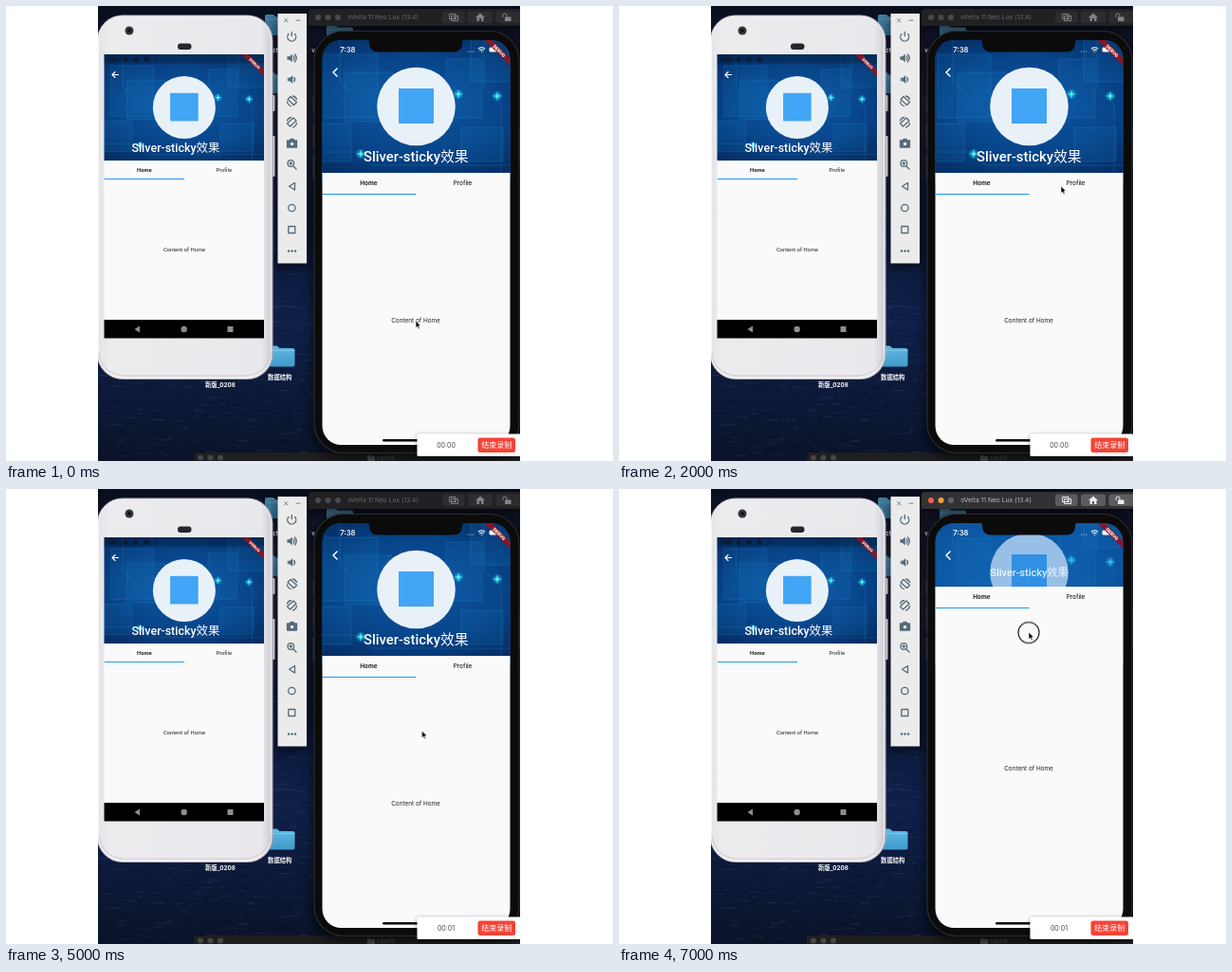
An HTML page for the animation above (8000 ms loop, 640 by 480 pixels).

```html
<!DOCTYPE html>
<html lang="zh">
<head>
<meta charset="utf-8">
<title>Sliver-sticky</title>
<style>
html, body { margin: 0; width: 100%; height: 100%; overflow: hidden; background: #fff; }
svg { display: block; width: 640px; height: 480px; }
text { text-anchor: middle; font-family: Inter, "Noto Sans CJK SC", "Noto Sans CJK", sans-serif; }
.rb text, .title { font-family: Roboto, "Noto Sans CJK SC", "Noto Sans CJK", sans-serif; }
.title { font-weight: 500; fill: #fff; }
.line { fill: none; stroke-linecap: round; stroke-linejoin: round; }

/* everything changes in hard one-second steps */
.cursor, .tap, .panel, .art, .head, .body, .t0, .t1, .on, .off {
  animation: 8s step-end infinite;
}
.cursor { animation-name: cursor; }
.tap { animation-name: tap; }
.panel { animation-name: panel; }
.art { animation-name: art; }
.head { animation-name: head; }
.body { animation-name: body; }
.t0 { animation-name: early; }
.t1 { animation-name: late; }
.off { animation-name: blur; }
.on { animation-name: focus; }

@keyframes cursor {
  0% { transform: translate(432px, 332px); }
  12.5% { transform: translate(447.5px, 206.5px); }
  25% { transform: translate(466px, 190px); }
  37.5% { transform: translate(474px, 186px); }
  50% { transform: translate(457px, 221px); }
  62.5% { transform: translate(438.5px, 255px); }
  75% { transform: translate(432px, 202.5px); }
  87.5%, 100% { transform: translate(432px, 151px); }
}
@keyframes tap {
  0% { visibility: hidden; }
  75% { visibility: visible; transform: translate(432px, 202.6px); }
  87.5%, 100% { visibility: visible; transform: translate(432px, 151.5px); }
}
@keyframes panel {
  0% { transform: none; }
  75% { transform: translateY(-.6px); }
  87.5%, 100% { transform: translateY(-73px); }
}
@keyframes art {
  0% { transform: none; opacity: 1; }
  75% { transform: translateY(-.2px); opacity: 1; }
  87.5%, 100% { transform: translateY(-18px); opacity: .62; }
}
@keyframes head {
  0% { transform: translate(432.3px, 163.6px); }
  75% { transform: translate(432.3px, 163px); }
  87.5%, 100% { transform: translate(432.3px, 92px) scale(.745); opacity: .85; }
}
@keyframes body {
  0% { transform: none; }
  75% { transform: translateY(-.3px); }
  87.5%, 100% { transform: translateY(-36.3px); }
}
@keyframes early { 0% { visibility: visible; } 62.5%, 100% { visibility: hidden; } }
@keyframes late { 0% { visibility: hidden; } 62.5%, 100% { visibility: visible; } }
@keyframes blur { 0% { visibility: visible; } 75%, 100% { visibility: hidden; } }
@keyframes focus { 0% { visibility: hidden; } 75%, 100% { visibility: visible; } }
</style>
</head>
<body>
<svg viewBox="0 0 640 480">
  <defs>
    <linearGradient id="sea" x2="0" y2="1">
      <stop offset="0" stop-color="#090e1e"/>
      <stop offset=".2" stop-color="#1a2036"/>
      <stop offset=".45" stop-color="#0b1838"/>
      <stop offset=".7" stop-color="#0f2049"/>
      <stop offset="1" stop-color="#0a1328"/>
    </linearGradient>
    <radialGradient id="sky" cx=".5" cy=".5" r=".65">
      <stop offset="0" stop-color="#0c59a8"/>
      <stop offset=".55" stop-color="#08458a"/>
      <stop offset="1" stop-color="#042b60"/>
    </radialGradient>
    <linearGradient id="shell">
      <stop offset="0" stop-color="#e3e4e9"/>
      <stop offset=".06" stop-color="#ececef"/>
      <stop offset=".94" stop-color="#e9e9ed"/>
      <stop offset="1" stop-color="#cfcfd6"/>
    </linearGradient>
    <linearGradient id="folder" x2="0" y2="1">
      <stop offset="0" stop-color="#62b9e2"/>
      <stop offset="1" stop-color="#3f9acb"/>
    </linearGradient>
    <radialGradient id="glow">
      <stop offset="0" stop-color="#7ff4ff"/>
      <stop offset=".3" stop-color="#19c3e2" stop-opacity=".75"/>
      <stop offset="1" stop-color="#12a0d8" stop-opacity="0"/>
    </radialGradient>
    <filter id="soft" x="-20%" y="-50%" width="140%" height="200%">
      <feDropShadow dx="0" dy="1" stdDeviation="2" flood-opacity=".45"/>
    </filter>
    <filter id="shade" x="-20%" y="-10%" width="140%" height="120%">
      <feGaussianBlur stdDeviation="6"/>
    </filter>
    <clipPath id="stage"><rect x="97" width="445" height="480"/></clipPath>
    <clipPath id="screenA"><rect x="103.5" y="51" width="168.5" height="299.5"/></clipPath>
    <clipPath id="screenB"><rect x="333.5" y="36" width="198" height="427" rx="20"/></clipPath>

    <g id="spark">
      <circle r="6" fill="url(#glow)"/>
      <path d="M0-5 .8-.8 5 0 .8 .8 0 5-.8 .8-5 0-.8-.8Z" fill="#5ff0f5"/>
    </g>

    <!-- banner picture, 140 high, centred on x = 0 -->
    <g id="banner">
      <rect x="-125" width="250" height="140" fill="url(#sky)"/>
      <g fill="#1c86cf" fill-opacity=".12" stroke="#2aa3de" stroke-opacity=".3" stroke-width=".7">
        <rect x="-96" y="15" width="56" height="67"/>
        <rect x="-75" y="34" width="50" height="52"/>
        <rect x="-104" y="88" width="36" height="40"/>
        <rect x="32" y="20" width="38" height="62"/>
        <rect x="58" y="-6" width="52" height="50"/>
        <rect x="48" y="92" width="44" height="36"/>
      </g>
      <path d="M-125 118H-60L-46 132H125M-80 0V44L-64 60M72 0V50L90 68V140" class="line" stroke="#33b5e6" stroke-opacity=".3" stroke-width=".6"/>
      <use href="#spark" x="45" y="57"/>
      <use href="#spark" x="86" y="59"/>
      <use href="#spark" x="-58" y="120"/>
      <circle cx=".5" cy="70" r="41.3" fill="#e9f1f8"/>
      <rect x="-18" y="51" width="37" height="37" fill="#42a5f5"/>
    </g>

    <g id="dirIcon">
      <path d="M-14-9q0-2 2-2h7l3 2.5h14q2 0 2 2V9q0 2-2 2h-24q-2 0-2-2Z" fill="url(#folder)"/>
      <path d="M-14-6h28" stroke="#8ccfea" stroke-width=".8"/>
    </g>

    <g id="ribbon">
      <path d="M-40 28H40V40H-40Z" fill="#94131f" fill-opacity=".9"/>
      <text y="37.6" font-size="10" font-weight="800" fill="#fff">DEBUG</text>
    </g>
    <g id="lights"><circle r="3"/><circle cx="10.5" r="3"/><circle cx="21" r="3"/></g>

    <!-- emulator window buttons -->
    <g id="winBtns" fill="currentColor">
      <rect x="460" y="5.5" width="23.5" height="12.5" rx="2"/>
      <rect x="487" y="5.5" width="26" height="12.5" rx="2"/>
      <rect x="516.5" y="5.5" width="30" height="12.5" rx="2"/>
    </g>
    <g id="winIcons">
      <path d="M468 8.500h6v5h-6ZM470 10.500h6.500v5h-6.500Z" class="line" stroke="currentColor"/>
      <circle cx="473.300" cy="13" r="1.300" fill="currentColor"/>
      <path d="M495 12 500 7.500 505 12H503.500V16H501V13H499V16H496.500V12Z" fill="currentColor"/>
      <path d="M526 11.500h6.500v4.500h-6.500Z" fill="currentColor"/>
      <path d="M524 11.500V10a2 2 0 0 1 4 0v1.500" class="line" stroke="currentColor"/>
    </g>
  </defs>

  <g clip-path="url(#stage)">
    <!-- desktop -->
    <rect x="97" width="445" height="480" fill="url(#sea)"/>
    <g id="waves" class="line" stroke-width=".8"/>
    <g opacity=".65">
      <use href="#dirIcon" x="287" y="20"/>
      <use href="#dirIcon" x="287" y="81"/>
    </g>
    <use href="#dirIcon" x="352" y="31" opacity=".6"/>
    <use href="#dirIcon" x="290.500" y="369.500"/>
    <g fill="#fff" font-size="6.300" font-weight="600">
      <text x="288.700" y="393.700">数据结构</text>
      <text x="226" y="402.200" font-size="6.300" font-weight="700">新版_0208</text>
      <text x="284" y="48.500" font-size="6">ct</text>
      <text x="324" y="48.500" font-size="6">v</text>
    </g>

    <!-- window at the bottom edge -->
    <path d="M198 480V474q0-3 3-3H542V480Z" fill="#1f1f21"/>
    <use href="#lights" x="205" y="476.500" fill="#464648"/>
    <path d="M381 474h3l1 1h4v5h-8Z" fill="#4e5154"/>
    <text x="400" y="479" font-size="6.500" fill="#58585b">case9</text>

    <!-- window shadows -->
    <g filter="url(#shade)" opacity=".6">
      <rect x="320" y="3" width="230" height="20"/>
      <rect x="323" y="28" width="222" height="450" rx="30"/>
      <rect x="286" y="12" width="31" height="264"/>
    </g>

    <!-- left phone -->
    <g class="rb">
      <rect x="280" y="94" width="3.500" height="17" rx="1" fill="#b9b3b8"/>
      <rect x="280" y="137" width="3.500" height="43" rx="1" fill="#c5bfc4"/>
      <rect x="96" y="9.500" width="185.500" height="384.500" rx="27" fill="#bdb4b9"/>
      <rect x="97.500" y="11" width="182" height="381.500" rx="25" fill="url(#shell)" stroke="#f5f5f8"/>
      <path d="M98 366Q101 388 124 390H252Q276 388 279 366" class="line" stroke="#cbbfc3" stroke-width=".8"/>
      <circle cx="130" cy="26" r="4.500" fill="#33363b"/>
      <circle cx="130" cy="26" r="2" fill="#10141c"/>
      <rect x="181" y="39.500" width="14.500" height="6.500" rx="3" fill="#26272a"/>
      <g clip-path="url(#screenA)">
        <use href="#banner" transform="translate(187.500 51) scale(.8)"/>
        <path d="M103 51h170v9.500H103Z" fill="#000" fill-opacity=".22"/>
        <g fill="#0a1c38">
          <rect x="108" y="54" width="11" height="4" rx="1"/>
          <circle cx="126" cy="56" r="2.600"/><circle cx="137" cy="56" r="2.600"/>
          <rect x="145.500" y="53.500" width="5" height="5" rx="1"/><circle cx="158.500" cy="56" r="1"/>
        </g>
        <path d="M103 163.500h170V331H103Z" fill="#fafafa"/>
        <path d="M118.500 72.500h-6.500m3-3-3 3 3 3" class="line" stroke="#fff" stroke-width="1.100"/>
        <text x="179" y="153.500" class="title" font-size="12.500">Sliver-sticky效果</text>
        <g font-size="5.800" fill="#212121">
          <text x="145.800" y="175" font-weight="700">Home</text>
          <text x="229.800" y="175">Profile</text>
          <text x="188" y="259.200">Content of Home</text>
        </g>
        <path d="M103.500 182h84.500v1h-84.500Z" fill="#2196f3"/>
        <path d="M103 331h170v20H103Z"/>
        <g fill="#8d8d8d">
          <path d="M141 337.500v7l-5.500-3.500Z"/><circle cx="187.700" cy="341" r="3.200"/>
          <rect x="233.500" y="338" width="6" height="6"/>
        </g>
        <use href="#ribbon" transform="translate(272 51) rotate(45) scale(.41)"/>
      </g>
    </g>

    <!-- tool strip -->
    <rect x="286.500" y="8" width="30.500" height="263.500" fill="#ebebeb"/>
    <g class="line" stroke="#546a78" stroke-width="1.300">
      <path d="m293.500 13.500 3.500 3.500m0-3.500-3.500 3.500m12.500-1.800h4" stroke-width=".8"/>
      <path d="M298 29.500a4.500 4.500 0 1 0 6.500 0M301.300 27.500v4"/>
      <g id="vol" fill="#546a78"><path d="M297 53.500h1.800l2.700-2.300v7.600l-2.700-2.300H297Z" stroke-width=".6"/></g>
      <path d="M303.300 53q1.600 2 0 4M304.500 51q3.500 4 0 8"/>
      <path d="M303.800 75.500q1.600 2 0 4"/>
      <use href="#vol" x=".5" y="22.500"/>
      <g id="turn">
        <path d="m297 98.500 3-3 6.500 6-3 3ZM296.500 101q.5 3.500 4 4.500M302.500 95q3 .5 4 3.500"/>
      </g>
      <use href="#turn" transform="translate(603 22.500) scale(-1 1)"/>
      <path d="M296.500 142h2.500l1-1.500h3l1 1.500h2.500v7h-10Z" fill="#546a78"/>
      <circle cx="301.500" cy="145.500" r="1.800" fill="#ebebeb" stroke="none"/>
      <circle cx="300.300" cy="166" r="3.300"/>
      <path d="m303 169 3 3m-7-6h2.600m-1.300-1.300v2.600"/>
      <path d="M304.500 186.500v7.500l-6-3.700Z"/>
      <circle cx="301.300" cy="213" r="3.700"/>
      <rect x="297.800" y="232.500" width="7" height="7"/>
    </g>
    <g fill="#546a78"><circle cx="298" cy="258.500" r="1.200"/><circle cx="301.500" cy="258.500" r="1.200"/><circle cx="305" cy="258.500" r="1.200"/></g>

    <!-- simulator title bar -->
    <g class="off">
      <path d="M319 21V7q0-4 4-4H542V21Z" fill="#212123"/>
      <use href="#lights" x="329" y="12" fill="#4a4a4c"/>
      <use href="#winBtns" color="#2d2d30"/>
      <use href="#winIcons" color="#838386"/>
      <text x="397.500" y="14.300" font-size="6.700" fill="#6a6a6e">oVelta 11 Neo Lux (13.4)</text>
    </g>
    <g class="on">
      <path d="M319 21V7q0-4 4-4H542V21Z" fill="#323235"/>
      <circle cx="329" cy="12" r="3" fill="#f65d55"/>
      <circle cx="339.500" cy="12" r="3" fill="#f0a33a"/>
      <circle cx="350" cy="12" r="3" fill="#646467"/>
      <use href="#winBtns" color="#5c5c5f"/>
      <use href="#winIcons" color="#ececee"/>
      <text x="397.500" y="14.300" font-size="6.700" fill="#bcbcc0">oVelta 11 Neo Lux (13.4)</text>
    </g>

    <!-- right phone -->
    <path d="M324.500 97v14m0 13v25m0 8v25M541.500 128v40" stroke="#2d2d2f" stroke-width="2"/>
    <rect x="325" y="26.500" width="216" height="445" rx="31" fill="#0b0b0c" stroke="#2c2c2e" stroke-width="1.200"/>
    <g clip-path="url(#screenB)">
      <path d="M333 36h199v150H333Z" fill="#156fc4"/>
      <g class="art"><use href="#banner" x="432" y="36"/></g>
      <g class="panel">
        <path d="M333 176h199v400H333Z" fill="#fafafa"/>
        <g font-size="6.400" fill="#212121">
          <text x="382.500" y="189.300" font-weight="700">Home</text>
          <text x="481.500" y="189.300" font-weight="500">Profile</text>
        </g>
        <path d="M333.500 198H432.500v1.100h-99Z" fill="#2196f3"/>
      </g>
      <g class="body"><text x="432" y="333.700" font-size="6.400" fill="#212121">Content of Home</text></g>
      <g class="head"><text class="title" font-size="14.800">Sliver-sticky效果</text></g>
      <path d="m349 66-4 4 4 4" class="line" stroke="#fff" stroke-width="1.500"/>
      <text x="360.300" y="49" font-size="7.600" font-weight="600" fill="#fff">7:38</text>
      <g fill="#fff">
        <circle cx="487.500" cy="48" r=".5"/><circle cx="490" cy="48" r=".5"/><circle cx="492.500" cy="48" r=".5"/>
        <rect x="509.500" y="43.500" width="10.500" height="5" rx="1.500"/>
      </g>
      <path d="M498.300 45q3.200-2.500 6.400 0m-5 1.700q1.800-1.400 3.600 0m-1.800 1.600v.1" class="line" stroke="#fff" stroke-width="1.100"/>
      <path d="M379 35H485q-4 0-4 4 0 9.500-10 9.500H393q-10 0-10-9.500 0-4-4-4Z" fill="#0b0b0c"/>
      <use href="#ribbon" transform="translate(531.500 36) rotate(45) scale(.478)"/>
      <rect x="397" y="457" width="70" height="2.400" rx="1.200"/>
    </g>

    <!-- recorder -->
    <rect x="433.500" y="451.500" width="110" height="23.500" rx="1.500" fill="#fff" filter="url(#soft)"/>
    <g font-size="7" fill="#444">
      <text x="464" y="465.800" class="t0">00:00</text>
      <text x="464" y="465.800" class="t1">00:01</text>
    </g>
    <rect x="497.500" y="455.500" width="39.500" height="15.500" rx="2.500" fill="#f44336"/>
    <text x="517.200" y="466.200" font-size="8" font-weight="500" fill="#fff">结束录制</text>

    <!-- pointer -->
    <circle class="tap line" r="11" stroke="#111" stroke-width="1.100"/>
    <path class="cursor" d="M0 0V7.500L1.700 6 2.900 8.700 4.200 8.100 3 5.500H5.300Z" stroke="#fff" stroke-width=".6"/>
  </g>
</svg>
<script>
// ripples on the water, always the same
let seed = 7;
const rnd = () => (seed = seed * 16807 % 2147483647) / 2147483647;
let ripples = "";
for (let i = 0; i < 900; i++) {
  const x = 97 + rnd() * 235, y = 150 + rnd() * 325, w = 3 + rnd() * 9;
  const tone = rnd() < .5 ? "#050b1a" : "#3f5688";
  ripples += `<path d="M${x} ${y}q${w / 2} ${rnd() * 3 - 1.5} ${w} 0" stroke="${tone}" opacity="${rnd() * .45}"/>`;
}
document.getElementById("waves").innerHTML = ripples;
</script>
</body>
</html>
```
